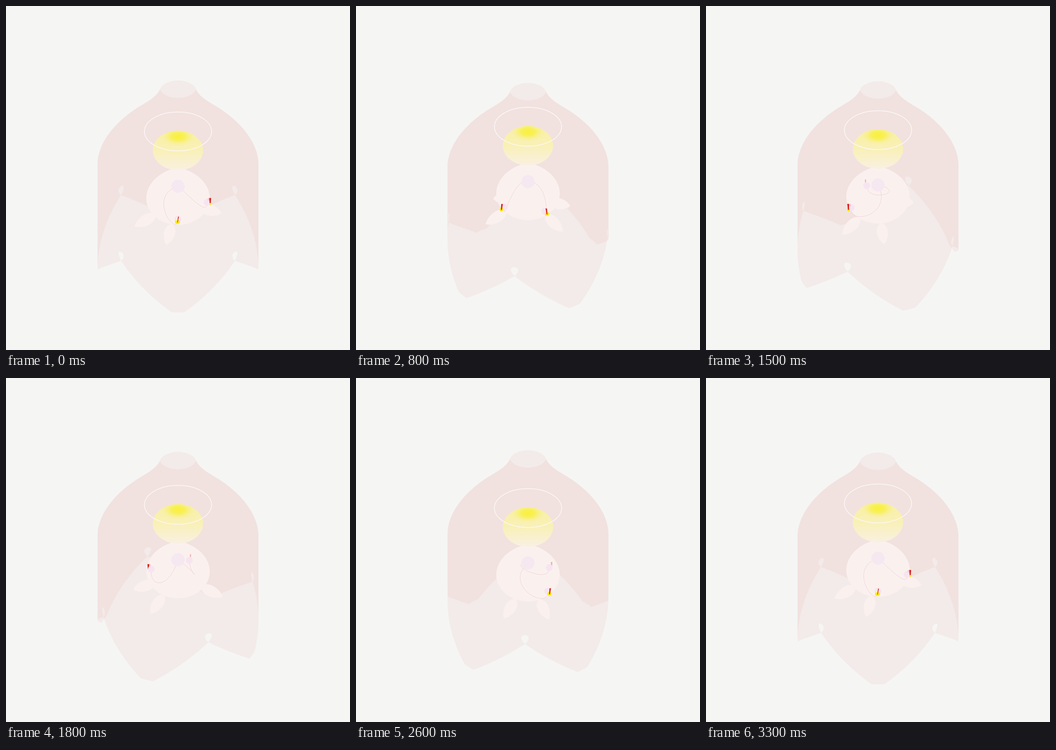
Animation, 748 px wide and 748 px high, one loop 3400 ms. Source, as an HTML page:

```html
<!DOCTYPE html>
<html lang="en">
<head>
<meta charset="utf-8">
<title>Turning cloak</title>
<style>
  html, body { margin: 0; width: 100%; height: 100%; overflow: hidden; background: #f5f5f4; }
  svg { display: block; width: 100vw; height: 100vh; }
</style>
</head>
<body>
<svg viewBox="0 0 748 748">
  <defs>
    <linearGradient id="pale" x1="0" y1="0" x2="0" y2="1">
      <stop offset="0" stop-color="#f8f0a2"/>
      <stop offset=".5" stop-color="#f9f0b8"/>
      <stop offset="1" stop-color="#f9f0e2"/>
    </linearGradient>
    <radialGradient id="glow" gradientUnits="userSpaceOnUse" cx="0" cy="0" r="1"
      gradientTransform="translate(374 284) scale(38 21)">
      <stop offset="0" stop-color="#f9f03a"/>
      <stop offset=".4" stop-color="#f8f04c" stop-opacity=".85"/>
      <stop offset="1" stop-color="#f8f0a2" stop-opacity="0"/>
    </radialGradient>
  </defs>
  <g id="cloak" fill="#de928c" fill-opacity=".1" fill-rule="evenodd">
    <path id="backWall"/>
    <path id="frontWall"/>
  </g>
  <g id="figure">
    <path id="feet" fill="#faf1ef"/>
    <path fill="#faf1ef" d="M362 354C325 366 305 392 305 418A69 58 0 0 0 443 418C443 392 423 366 386 354Z"/>
    <g id="strings" fill="none" stroke="#f3d3d6"></g>
    <g id="behind"></g>
    <circle cx="374" cy="392" r="14.5" fill="#f6e8f0"/>
    <g id="before"></g>
    <ellipse cx="374" cy="314" rx="54.7" ry="43" fill="url(#pale)"/>
    <ellipse cx="374" cy="314" rx="54.7" ry="43" fill="url(#glow)"/>
    <ellipse cx="374" cy="272.8" rx="73" ry="42.2" fill="none" stroke="#fcf8f7" stroke-width="1.5"/>
  </g>
</svg>
<script>
const FRAME = 100, FRAMES = 34, TILT = 0.577, CX = 374, HEART = 392;
const RAD = Math.PI / 180;
const get = id => document.getElementById(id);
const sin = deg => Math.sin(deg * RAD), cos = deg => Math.cos(deg * RAD);
const fmt = ([x, y]) => x.toFixed(2) + ' ' + y.toFixed(2);

// Angle 0 faces the viewer, 90 points right; drop is measured on screen.
const place = (angle, radius, drop) =>
  [CX + radius * sin(angle), drop + TILT * radius * cos(angle)];

// Cloak hem: four low points with a teardrop hole at each notch.
const hemPoint = (angle, drop) => place(angle, 175, 482.5 + drop);

function hemDrop(angle) {
  const fromTip = ((angle + 45) % 90 + 90) % 90 - 45;
  return Math.min(82.5, 2.05 * (45 - Math.abs(fromTip)));
}

function teardrop(angle) {
  const points = [];
  for (let i = 0; i <= 20; i++) {
    const t = i / 20, k = t * (1 - t);
    points.push(fmt(hemPoint(angle + 27 * k * (2 * t - 1), -77 * k)));
  }
  return 'M' + points.join('L') + 'Z';
}

function wall(turn, front) {
  const hem = [];
  for (let a = -90; a <= 90; a += 0.75) {
    const angle = front ? a : 180 - a;
    hem.push(fmt(hemPoint(angle, hemDrop(angle + turn))));
  }
  let d = 'M335 181C326 200 303 210 283 223C234 255 199 300 199 345L' + hem.join('L') +
    'L549 345C549 300 514 255 465 223C445 210 422 200 413 181' +
    `A39.5 22.5 0 0 ${front ? 1 : 0} 335 181Z`;
  for (let k = 0; k < 4; k++) {
    const angle = 45 + 90 * k - turn;
    if ((cos(angle) > 0) === front) d += teardrop(angle);
  }
  return d;
}

function foot(angle) {
  const base = place(angle, 50, HEART + 54), tip = place(angle, 98, HEART + 73);
  const dx = tip[0] - base[0], dy = tip[1] - base[1], len = Math.hypot(dx, dy);
  const at = (along, side) =>
    fmt([base[0] + dx * along - dy / len * side, base[1] + dy * along + dx / len * side]);
  return `M${at(0, 0)}C${at(0.15, 18)} ${at(0.75, 14)} ${at(1, 0)}` +
    `C${at(0.75, -14)} ${at(0.15, -18)} ${at(0, 0)}Z`;
}

function string(angle, side) {
  const at = (out, across, drop) => {
    const p = place(angle, out, HEART + drop), q = place(angle + 90 * side, across, 0);
    return fmt([p[0] + q[0] - CX, p[1] + q[1]]);
  };
  return `<path d="M${at(0, 0, 0)}C${at(-8, 70, 27)} ${at(68, 0, 76)} ${at(63, 0, 35)}"/>`;
}

function hand(angle, side) {
  const [x, y] = place(angle, 63, HEART + 35);
  const [mx, my] = place(angle, 70, HEART + 32);
  const facing = cos(angle), edge = sin(angle), away = facing < -0.2;
  const half = 0.9 + 1.1 * Math.abs(edge), lean = -side * 1.1 * Math.max(0, facing);
  const ball = `<circle cx="${x}" cy="${y}" r="7.5" fill="#f6e5f0"/>`;
  const flame = away ? '' :
    `<ellipse cx="${mx - lean}" cy="${my + 5.5}" rx="${1.2 + 4.3 * Math.abs(facing)}" ry="4.4" fill="#fdea1c"/>`;
  const blush = Math.abs(edge) > 0.85
    ? `<rect x="${mx - 3.5 * Math.sign(edge) - 1.7}" y="${my - 6.5}" width="3.4" height="5.5" fill="#f4c6cc"/>` : '';
  const bottom = my + (facing < 0.3 ? 4.5 : 6.5);
  const stick = `<path fill="#d81e1e" d="M${mx + lean - half} ${my - 6.5}H${mx + lean + half}` +
    `L${mx - lean + half * 0.6} ${bottom}H${mx - lean - half * 0.6}Z"/>`;
  const match = `<g opacity="${facing < -0.5 ? 0.3 : 1}">${blush}${flame}${stick}</g>`;
  return away ? match + ball : ball + match;
}

function draw(p) {
  const wave = Math.sin(2 * Math.PI * p);
  const turn = 360 * (p - 0.0895 * wave - 0.0135 * Math.sin(4 * Math.PI * p));

  get('cloak').setAttribute('transform', `translate(0 ${5.2 * wave})`);
  get('figure').setAttribute('transform', `translate(0 ${-10.3 * wave})`);
  get('backWall').setAttribute('d', wall(turn, false));
  get('frontWall').setAttribute('d', wall(turn, true));
  get('feet').setAttribute('d', [-75, -15, 105, 165].map(a => foot(a - turn)).join(''));

  const layers = { strings: '', behind: '', before: '' };
  for (const [start, side] of [[90, 1], [0, -1]]) {
    const angle = start - turn;
    layers.strings += string(angle, side);
    layers[cos(angle) < -0.2 ? 'behind' : 'before'] += hand(angle, side);
  }
  for (const id in layers) get(id).innerHTML = layers[id];
}

let shown = -1;
const begin = performance.now();
function tick() {
  const step = Math.floor((performance.now() - begin) / FRAME) % FRAMES;
  if (step !== shown) {
    shown = step;
    draw(step / (FRAMES - 1));
  }
  requestAnimationFrame(tick);
}
tick();
</script>
</body>
</html>
```
